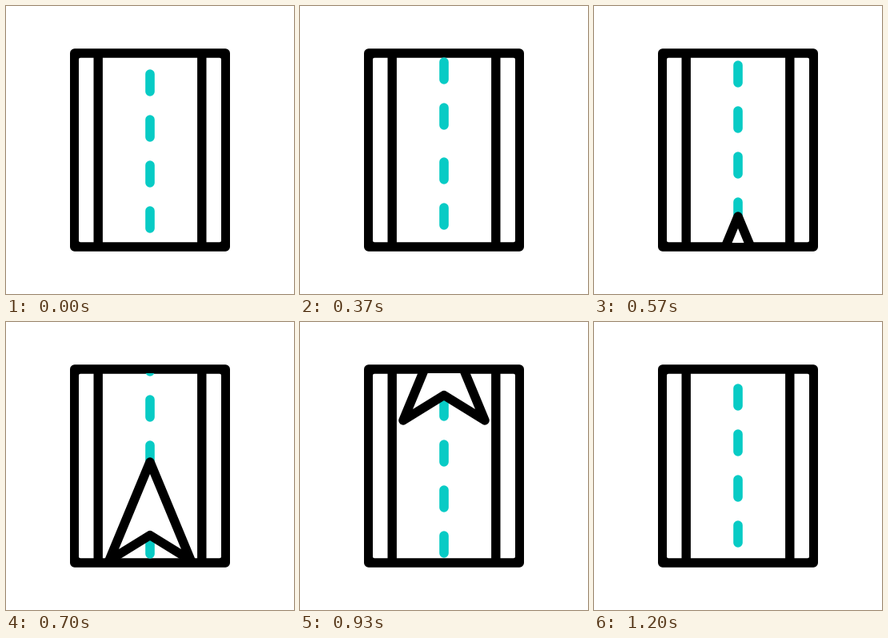
Write an HTML page without scripts that moves like this. It is 360 by 360 pixels and loops after 1670 ms.

```html
<!DOCTYPE html>
<html lang="en">
<head>
<meta charset="utf-8">
<title>Road navigation</title>
<style>
  html, body { margin: 0; width: 100%; height: 100%; overflow: hidden; background: #fff; }
  svg { display: block; width: 100vw; height: 100vh; }
  .line { fill: none; stroke: #000; stroke-width: 11.4; stroke-linecap: round; stroke-linejoin: round; }
  .dashes { fill: none; stroke: #08cbc5; stroke-width: 11.6; stroke-linecap: round; stroke-dasharray: 22 35; }
  .arrow { fill: #fff; }
  /* 2% is one drawing step of the 30 fps motion */
  .dashes, .arrow { animation: road 1670ms -6ms steps(2) infinite; }
  .arrow { animation-name: drive; }

  @keyframes road {
    0%   { transform: translateY(0); }
    4%   { transform: translateY(-4px); }
    8%   { transform: translateY(-20px); }
    12%  { transform: translateY(-45px); }
    16%  { transform: translateY(-77px); animation-timing-function: steps(3); }
    22%  { transform: translateY(-129px); animation-timing-function: steps(3); }
    28%  { transform: translateY(-187px); animation-timing-function: steps(3); }
    34%  { transform: translateY(-250px); animation-timing-function: steps(4); }
    42%  { transform: translateY(-341px); animation-timing-function: steps(4); }
    50%  { transform: translateY(-438px); animation-timing-function: steps(3); }
    56%  { transform: translateY(-513px); }
    60%  { transform: translateY(-560px); }
    64%  { transform: translateY(-594px); animation-timing-function: steps(1); }
    66%  { transform: translateY(-598px); animation-timing-function: steps(1); }
    68%  { transform: translateY(-594px); }
    72%, 100% { transform: translateY(-583px); }
  }
  @keyframes drive {
    0%, 30% { transform: translateY(236px); }
    34%  { transform: translateY(192px); animation-timing-function: steps(4); }
    42%  { transform: translateY(104px); animation-timing-function: steps(4); }
    50%  { transform: translateY(0); animation-timing-function: steps(3); }
    56%  { transform: translateY(-71px); animation-timing-function: steps(4); }
    64%, 100% { transform: translateY(-160px); }
  }
</style>
</head>
<body>
<svg viewBox="0 0 360 360">
  <clipPath id="inside"><rect x="91" y="64.7" width="178" height="230.6"/></clipPath>
  <rect x="80" y="53.3" width="200" height="253.4" rx="5.7"/>
  <rect x="91" y="64.7" width="178" height="230.6" rx="2" fill="#fff"/>
  <g clip-path="url(#inside)">
    <path class="dashes" d="M180 85v193M180 324v535"/>
    <path class="line arrow" d="M180 71L231 194L180 162.5L129 194Z"/>
  </g>
  <path class="line" d="M115.2 60V300M244.8 60V300"/>
</svg>
</body>
</html>
```
